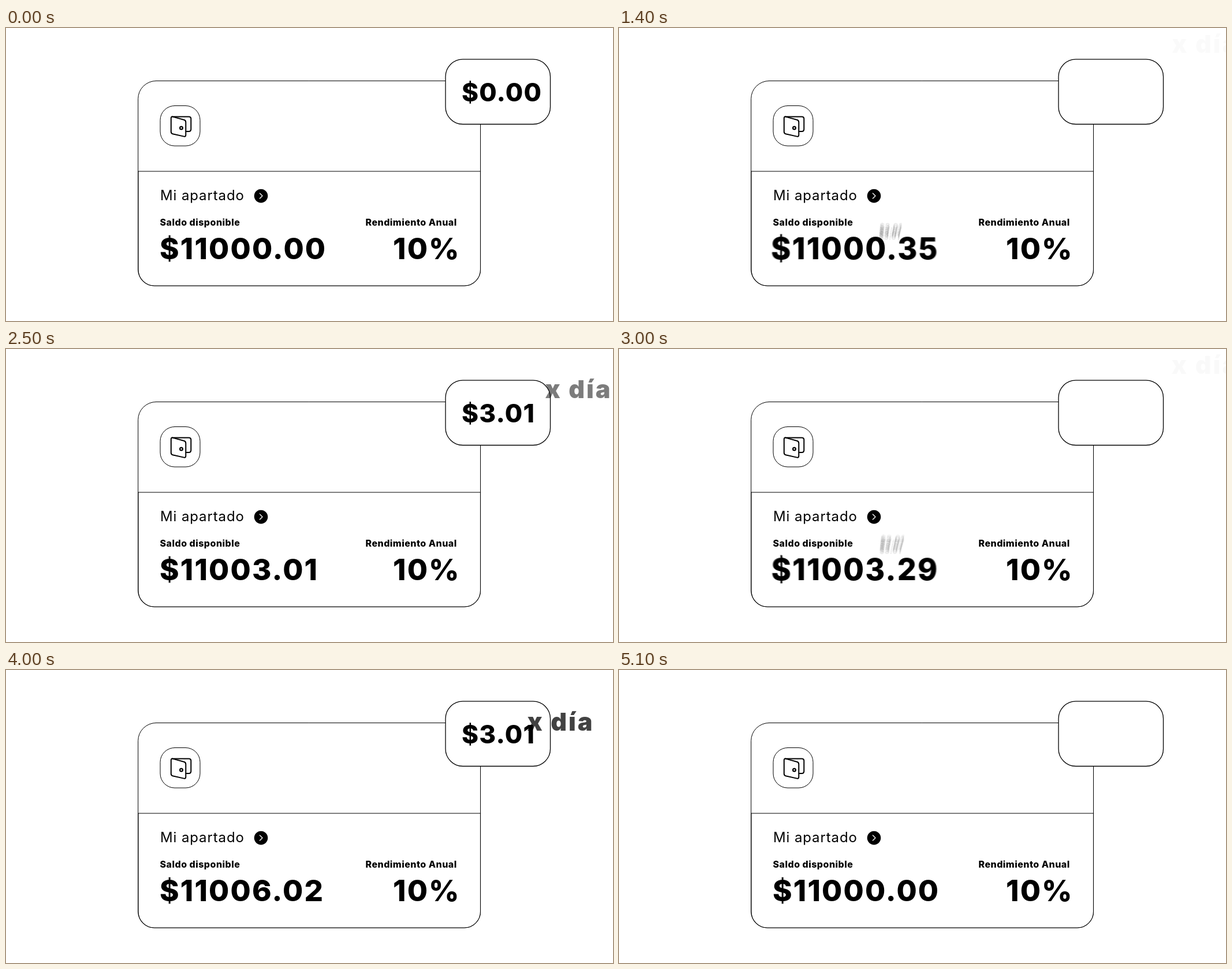
Animation, 1051 px wide and 507 px high, one loop 5600 ms. Source, as an HTML page with a canvas:

```html
<!DOCTYPE html>
<html lang="es">
<head>
<meta charset="utf-8">
<title>Mi apartado</title>
<style>
  html, body { margin: 0; width: 100%; height: 100%; overflow: hidden; background: #fff; }
  canvas { display: block; width: 1051px; height: 507px; }
</style>
</head>
<body>
<canvas id="stage" width="1051" height="507"></canvas>
<script>
const WIDTH = 1051, HEIGHT = 507;
const LOOP = 5600, STEP = 100, RESET = 5100;
const BASE = 11000, DAILY = 3.01;
const SAMPLES = 16;

// Each payout: when it starts and where its "x día" label begins.
const cycles = [
  { start: 0, labelX: 914 },
  { start: 1610, labelX: 910 },
  { start: 3300, labelX: 883 }
];

const fonts = {
  title: { weight: 400, size: 24, tracking: 0.037 },
  caption: { weight: 800, size: 16, tracking: 0.03 },
  balance: { weight: 800, size: 51, tracking: 0.042 },
  payout: { weight: 800, size: 44, tracking: 0.027 },
  label: { weight: 900, size: 43, tracking: 0.07 }
};

const ctx = document.getElementById('stage').getContext('2d');
const layer = new OffscreenCanvas(WIDTH, HEIGHT).getContext('2d');

const clamp = v => Math.min(1, Math.max(0, v));
const progress = (t, start, duration) => clamp((t - start) / duration);
const smooth = u => u * u * (3 - 2 * u);
const mix = (a, b, u) => a + (b - a) * u;
const bezier = (a, b, c, u) => mix(mix(a, b, u), mix(b, c, u), u);
const pulse = u => Math.sin(Math.PI * u);
const money = v => '$' + v.toFixed(2);

function setFont(g, { weight, size, tracking }) {
  g.font = `${weight} ${size}px Inter, sans-serif`;
  g.letterSpacing = `${size * tracking}px`;
}

function text(g, string, x, y, font) {
  setFont(g, font);
  g.fillText(string, x, y);
}

function scaledAround(g, cx, cy, scale, paint) {
  g.save();
  g.translate(cx, cy);
  g.scale(scale, scale);
  g.translate(-cx, -cy);
  paint();
  g.restore();
}

// Averages several samples; offset runs from -0.5 to 0.5 of the shutter.
function blurred(paint, alpha = 1) {
  layer.clearRect(0, 0, WIDTH, HEIGHT);
  layer.globalCompositeOperation = 'lighter';
  layer.globalAlpha = 1 / SAMPLES;
  for (let k = 0; k < SAMPLES; k++) paint(layer, k / (SAMPLES - 1) - 0.5);
  ctx.save();
  ctx.globalAlpha = alpha;
  ctx.drawImage(layer.canvas, 0, 0);
  ctx.restore();
}

function roundBox(x, y, w, h, radii, lineWidth) {
  ctx.beginPath();
  ctx.roundRect(x, y, w, h, radii);
  ctx.fillStyle = '#fff';
  ctx.fill();
  ctx.lineWidth = lineWidth;
  ctx.stroke();
  ctx.fillStyle = '#000';
}

function drawWallet() {
  roundBox(267, 134.5, 69, 69.5, 25, 1);
  ctx.lineWidth = 2;
  ctx.lineJoin = ctx.lineCap = 'round';
  ctx.stroke(new Path2D(
    'M288 153.4H316.5Q320.3 153.4 320.3 157V175Q320.3 179 316.5 179H311.5'));
  ctx.stroke(new Path2D(
    'M285.8 156Q285.8 152.6 289 153.6L308.5 159Q311.3 160 311.3 163V185Q311.3 188.4 308 187.6' +
    'L288.5 183.3Q285.8 182.5 285.8 179.5Z'));
  ctx.lineWidth = 2.2;
  ctx.beginPath();
  ctx.arc(303.5, 173, 2.4, 0, Math.PI * 2);
  ctx.stroke();
}

function drawArrow() {
  ctx.beginPath();
  ctx.arc(441.5, 290.6, 11.8, 0, Math.PI * 2);
  ctx.fill();
  ctx.save();
  ctx.strokeStyle = '#fff';
  ctx.lineWidth = 1.3;
  ctx.stroke(new Path2D('M439.4 286L444 290.5L439.4 295'));
  ctx.restore();
}

function drawCard() {
  roundBox(228.7, 91.5, 592.8, 354.5, [31, 31, 28, 28], 1);
  roundBox(229, 248, 592.5, 198, [0, 0, 28, 28], 1.1);
  drawWallet();
  drawArrow();
  text(ctx, 'Mi apartado', 267, 298, fonts.title);
  text(ctx, 'Saldo disponible', 266.5, 342, fonts.caption);
  text(ctx, 'Rendimiento Anual', 622.5, 342, fonts.caption);
  text(ctx, '10%', 670, 400, fonts.balance);
  roundBox(761, 54.2, 181.5, 112.3, 30, 1.3);
}

function drawBalance(t) {
  let value = BASE, active = null;
  for (const { start } of cycles) {
    const u = progress(t, start + 1353, 400);
    value += DAILY * u;
    if (u > 0 && u < 1) active = start + 1353;
  }
  const paint = g => text(g, money(value), 266, 400, fonts.balance);
  if (active === null) return paint(ctx);
  blurred((g, offset) => {
    const scale = 1 + 0.055 * pulse(progress(t + offset * 50, active, 400));
    scaledAround(g, 409, 382, scale, () => paint(g));
  });
}

// The cents smear sideways while the amount is running.
function paintPayout(g, value, smear) {
  const [whole, cents] = money(value).split('.');
  const x = 789, y = 127;
  text(g, whole + '.', x, y, fonts.payout);
  g.fillText(cents, x + g.measureText(whole + '.').width + smear, y);
}

function drawPayout(t) {
  const value = DAILY * clamp(t / 469);
  const popping = t > 280 && t < 570;
  if (t === 0 || (value === DAILY && !popping)) {
    text(ctx, money(value), 789, 127, fonts.payout);
    return;
  }
  blurred((g, offset) => {
    const scale = 1 + 0.38 * pulse(progress(t + offset * 12, 280, 290));
    const smear = value < DAILY ? offset * 4 : 0;
    scaledAround(g, 852, 109.5, scale, () => paintPayout(g, value, smear));
  });
}

function drawFlight(t) {
  const at = time => smooth(progress(time, 1140, 300));
  blurred((g, offset) => {
    const p = at(t + offset * 16);
    g.save();
    g.translate(bezier(852, 490, 466, p), bezier(110, 90, 380, p));
    g.scale(1 - 0.74 * p, 1 - 0.74 * p);
    g.translate(-852, -110);
    text(g, money(DAILY), 789, 127, fonts.payout);
    g.restore();
  }, 1 - 0.3 * at(t));
}

function drawLabel(t, startX) {
  const p = smooth(progress(t, 300, 1200));
  ctx.save();
  ctx.globalAlpha = 1 - p;
  text(ctx, 'x día', mix(startX, 958, p), mix(127, 41, p), fonts.label);
  ctx.restore();
}

function drawCycle(t, labelX) {
  if (t < 0) return;
  if (t < 1140) drawPayout(t);
  else if (t < 1440) drawFlight(t);
  if (t > 300 && t < 1500) drawLabel(t, labelX);
}

function render(t) {
  ctx.fillStyle = '#fff';
  ctx.fillRect(0, 0, WIDTH, HEIGHT);
  ctx.fillStyle = ctx.strokeStyle = '#000';
  drawCard();
  if (t >= RESET) {
    text(ctx, money(BASE), 266, 400, fonts.balance);
    return;
  }
  drawBalance(t);
  for (const { start, labelX } of cycles) drawCycle(t - start, labelX);
}

const origin = performance.now();
function tick() {
  const elapsed = (performance.now() - origin) % LOOP;
  render(Math.floor(elapsed / STEP) * STEP);
  requestAnimationFrame(tick);
}
tick();
</script>
</body>
</html>
```
